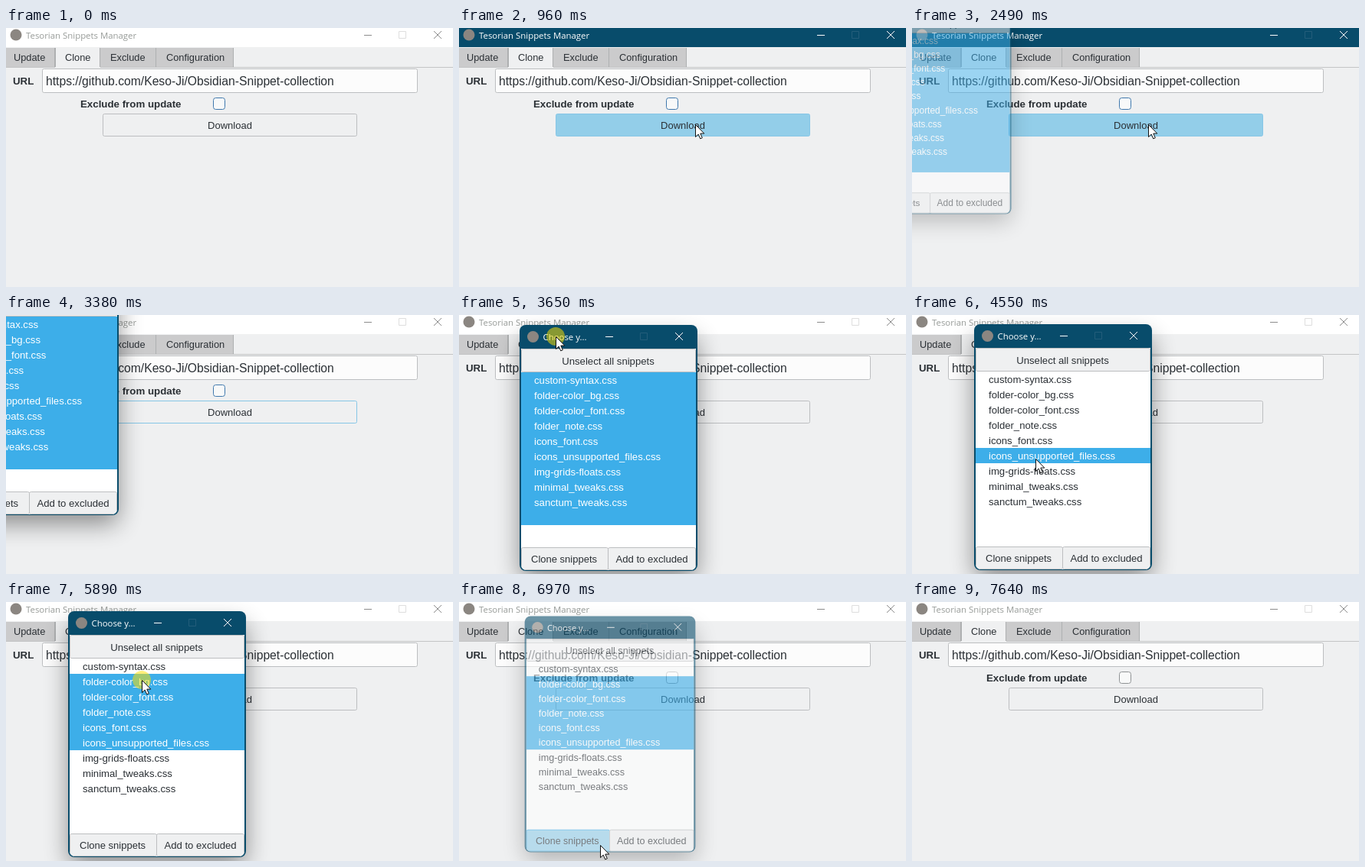
An HTML page for the animation above (8 s loop, 583 px wide and 339 px high).

```html
<!DOCTYPE html>
<html lang="en">
<head>
<meta charset="utf-8">
<title>Snippets Manager</title>
<style>
html, body { margin: 0; width: 100%; height: 100%; overflow: hidden; background: #eff0f1; }
svg { display: block; width: 100vw; height: 100vh; }
text { font: 13px "Liberation Sans", Arial, sans-serif; fill: #2b3035; white-space: pre; }
.caption { font: 11.4px "Open Sans", sans-serif; }
.label { font-weight: bold; font-size: 13.3px; }
.url { font-size: 15.7px; }
.tab { font-size: 12.8px; }
.item { font-size: 13.15px; }
.mid { text-anchor: middle; }
</style>
</head>
<body>
<svg id="stage" viewBox="0 0 583 339" preserveAspectRatio="none">
  <defs>
    <filter id="blur" x="-40%" y="-40%" width="180%" height="180%"><feGaussianBlur stdDeviation="16"/></filter>
    <clipPath id="inside"><rect x="1" y="0" width="228" height="320" rx="7"/></clipPath>
  </defs>
</svg>
<script>
const LOOP = 8000, FRAME = 70;
const BG = '#eff0f1', LINE = '#bcbec0', BLUE = '#3daee9', PRESSED = '#93cee9', NAVY = '#084c6b', INK = '#2b3035';
const stage = document.getElementById('stage');

function set(node, attrs) {
  for (const key in attrs) node.setAttribute(key, attrs[key]);
  return node;
}
function add(parent, tag, attrs, content) {
  const node = set(document.createElementNS('http://www.w3.org/2000/svg', tag), attrs || {});
  if (content) node.textContent = content;
  return parent.appendChild(node);
}
const box = (parent, x, y, width, height, fill, more) =>
  add(parent, 'rect', { x, y, width, height, fill, ...more });
const frame = (parent, x, y, w, h, fill, stroke = LINE, rx = 2) =>
  box(parent, x + .5, y + .5, w - 1, h - 1, fill, { stroke, rx });
const label = (parent, x, y, content, cls = '') =>
  add(parent, 'text', { x, y, class: cls }, content);

// Minimise, maximise and close signs, spaced evenly
function signs(parent, x, y) {
  const path = d => add(parent, 'path', { d, fill: 'none', stroke: '#fff' });
  return [
    path(`M${x} ${y + .5}h10`),
    path(`M${x + 45.5} ${y - 4.5}h9v9h-9z`),
    path(`M${x + 91} ${y - 5}l10 10m0-10l-10 10`)
  ];
}

// Main window
const main = add(stage, 'g');
box(main, 0, 0, 583, 339, BG);
const bar = box(main, 0, 0, 583, 25, '#fff');
add(main, 'circle', { cx: 13, cy: 9, r: 7.5, fill: '#8b8681' });
const caption = label(main, 26, 14, 'Tesorian Snippets Manager', 'caption');
const mainSigns = signs(main, 467, 9);

box(main, 0, 51, 583, 1, '#c3c4c5');
[[0, 64, 'Update', 10], [64, 59, 'Clone', 77], [123, 73, 'Exclude', 136], [196, 101, 'Configuration', 209]]
  .forEach(([x, w, name, tx], i) => {
    box(main, x, i === 1 ? 25 : 26, w, i === 1 ? 27 : 25, i === 1 ? BG : '#cbcbcc');
    box(main, x + w - 1, 26, 1, 25, '#aeb0b1');
    label(main, tx, 43, name, 'tab');
  });
box(main, 64, 26, 1, 25, '#aeb0b1');

label(main, 9, 74, 'URL', 'label');
frame(main, 47, 53, 490, 32, '#fcfcfc');
label(main, 52, 75, 'https://github.com/Keso-Ji/Obsidian-Snippet-collection', 'url');
label(main, 97, 104, 'Exclude from update', 'label');
const check = frame(main, 270, 91, 16, 16, '#f8f9f9', LINE, 3);
const download = frame(main, 126, 112, 332, 30, BG);
label(main, 292, 132, 'Download', 'mid');

// Dialog
const W = 230, H = 320, ROW = 20, LIST = 61;
const dialog = add(stage, 'g');
box(dialog, 0, 16, W, H - 4, '#000', { rx: 8, opacity: .43, filter: 'url(#blur)' });
box(dialog, -1, -1, W + 2, H + 2, NAVY, { rx: 8 });
add(dialog, 'circle', { cx: 16.5, cy: 14.5, r: 7.5, fill: '#8b8681' });
set(label(dialog, 29.5, 19, 'Choose y...', 'caption'), { style: 'fill:#fff' });
signs(dialog, 111, 14)[1].setAttribute('stroke', '#235d7a');

const body = add(dialog, 'g', { 'clip-path': 'url(#inside)' });
box(body, 1, 30, 228, 290, '#fff');
frame(body, 1, 30, 228, 31, BG);
label(body, 114.5, 51, 'Unselect all snippets', 'mid item');
const files = ['custom-syntax', 'folder-color_bg', 'folder-color_font', 'folder_note', 'icons_font',
  'icons_unsupported_files', 'img-grids-floats', 'minimal_tweaks', 'sanctum_tweaks'];
const mark = box(body, 1, LIST, 228, ROW, BLUE);
const items = files.map((name, i) => label(body, 18, LIST + ROW * i + 15, name + '.css', 'item'));
const clone = frame(body, 1, 290, 114, 30, BG);
frame(body, 114, 290, 115, 30, BG);
label(body, 57, 310, 'Clone snippets', 'mid');
label(body, 171.5, 310, 'Add to excluded', 'mid item');

// Pointer
const pointer = add(stage, 'g');
const halo = add(pointer, 'circle', { r: 12, fill: '#ffe100', opacity: .52 });
add(pointer, 'path', {
  d: 'M.5.5V16.6L4.2 13.1 6.7 18.9 9.3 17.8 6.8 12.1H11.8Z',
  fill: '#fff', stroke: '#111', 'stroke-width': 1, 'stroke-linejoin': 'round'
});

const within = (t, a, b) => t >= a && t < b;
const mix = (a, b, k) => a + (b - a) * k;
// Latest entry of [time, ...values] that has begun
const held = (keys, t) => keys.filter(k => k[0] <= t).pop();

const places = [[0, -91, -63], [3380, -84, -59], [3510, -38, -38], [3580, 36, -5], [3650, 80, 14], [3720, 81, 14], [3920, 82, 13]];
const looks = [[0, 1, 0], [2490, .91, .5], [2560, .96, .8], [2630, .99, .95], [2700, 1, 1],
  [6970, .96, .6], [7040, .92, .25], [7170, 1, 0]];
const rows = [[0, 0, 10], [4480, 5, 1], [5820, 1, 5]];
// Pointer moves: start, end, from, to, sideways bend
const moves = [
  [130, 760, 332, 293, 308, 126, 0],
  [2630, 3050, 308, 126, -45, -49, 0],
  [4200, 4410, 128, 27, 161, 188, 0],
  [5540, 5750, 161, 188, 177, 102, 0],
  [6280, 6700, 177, 102, 184, 318, 18],
  [7570, 7640, 160, 330, 160, 345, 0]
];

function pointerAt(t, dx, dy) {
  if (within(t, 3380, 4200)) return [dx + 46, dy + 14];
  const move = held(moves, t);
  if (!move || t >= 7640) return [-60, -60];
  const [a, b, x0, y0, x1, y1, bend] = move;
  const n = Math.round((b - a) / FRAME);
  const first = a === 130 || a === 7570 ? 0 : 1;
  const k = Math.min(1, (Math.floor((t - a) / FRAME) + first) / n);
  const e = k * k * (3 - 2 * k);
  return [mix(x0, x1, e) + bend * Math.sin(Math.PI * e), mix(y0, y1, e)];
}

function draw(t) {
  const active = within(t, 820, 3380);
  bar.setAttribute('fill', active ? NAVY : '#fff');
  caption.style.fill = active ? '#fff' : '#979b98';
  const colors = active ? ['#fff', '#235d7a', '#fff'] : ['#8c8c8c', '#dedede', '#8c8c8c'];
  mainSigns.forEach((s, i) => s.setAttribute('stroke', colors[i]));
  check.setAttribute('stroke', t < 3510 ? '#3f78ad' : '#8f9294');
  set(download, {
    fill: within(t, 960, 2700) ? PRESSED : BG,
    stroke: within(t, 690, 3510) ? '#86c6e6' : LINE
  });

  const [, dx, dy] = held(places, t);
  const [, scale, opacity] = held(looks, t);
  set(dialog, {
    opacity,
    visibility: opacity ? 'visible' : 'hidden',
    transform: `translate(${dx + W / 2} ${dy + H / 2}) scale(${scale}) translate(${-W / 2} ${-H / 2})`
  });
  const [, start, count] = held(rows, t);
  set(mark, { y: LIST + ROW * start, height: ROW * count });
  items.forEach((item, i) => { item.style.fill = within(i, start, start + count) ? '#fff' : INK; });
  set(clone, {
    fill: within(t, 6770, 7170) ? PRESSED : BG,
    stroke: t >= 6630 ? BLUE : LINE
  });

  const [px, py] = pointerAt(t, dx, dy);
  pointer.setAttribute('transform', `translate(${px.toFixed(1)} ${py.toFixed(1)})`);
  const down = [[820, 960], [3380, 4060], [4480, 4550], [5820, 6020], [6770, 6970]].some(([a, b]) => within(t, a, b));
  halo.setAttribute('visibility', down ? 'visible' : 'hidden');
}

const begin = performance.now();
function tick() {
  draw((performance.now() - begin) % LOOP);
  requestAnimationFrame(tick);
}
tick();
</script>
</body>
</html>
```
